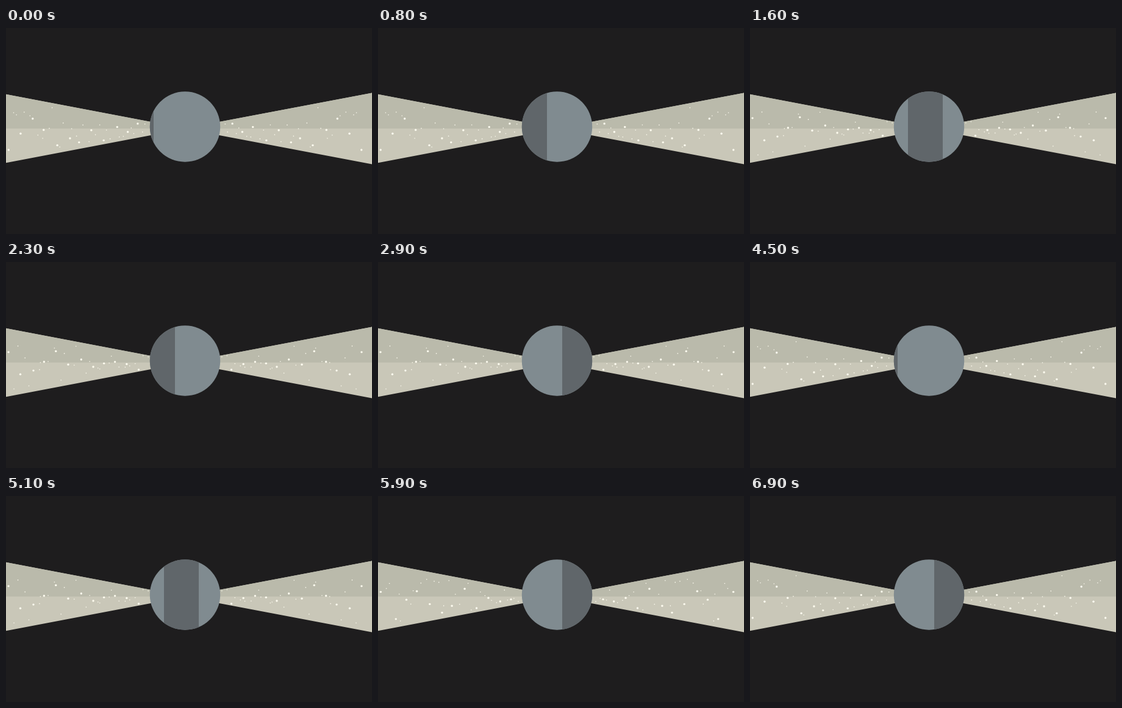
These frames come from a looping animation (600x338 px, 7000 ms). An HTML page with a canvas:

```html
<!DOCTYPE html>
<html lang="en">
<head>
<meta charset="utf-8">
<title>Lighthouse lamp</title>
<style>
  html, body { margin: 0; width: 100%; height: 100%; overflow: hidden; background: #1e1d1e; }
  canvas { display: block; }
</style>
</head>
<body>
<canvas width="600" height="338"></canvas>
<script>
const ctx = document.querySelector('canvas').getContext('2d');
const STEP = 100, STEPS = 70;
const LAMP = { x: 293.5, y: 162, r: 57.7 };
const BAND_WIDTH = 57;
const BEAM = { left: -14, right: 240, middle: 165, farHalf: 58.8, nearHalf: 10.4 };
const SPECKS = 36;

const halfHeight = x => BEAM.nearHalf +
  (BEAM.farHalf - BEAM.nearHalf) * (BEAM.right - x) / (BEAM.right - BEAM.left);

function seededRandom(seed) {
  return () => (seed = seed * 16807 % 2147483647) / 2147483647;
}

// Specks are spread evenly along the beam; every third one is large.
function makeDust(seed) {
  const random = seededRandom(seed);
  return Array.from({ length: SPECKS }, (_, i) => {
    const x = 4 + (i + random()) * 230 / SPECKS;
    const y = BEAM.middle + halfHeight(x) * (random() * 1.7 - 0.85);
    return { x, y, r: i % 3 ? 0.8 : 1.7 };
  });
}

const dust = [1234, 5678, 9012].map(makeDust);

function polygon(color, ...points) {
  ctx.fillStyle = color;
  ctx.beginPath();
  points.forEach(([x, y]) => ctx.lineTo(x, y));
  ctx.fill();
}

function disc(color, { x, y, r }) {
  ctx.fillStyle = color;
  ctx.beginPath();
  ctx.arc(x, y, r, 0, 2 * Math.PI);
  ctx.fill();
}

function beam(specks) {
  const { left, right, middle, farHalf, nearHalf } = BEAM;
  const topFar = [left, middle - farHalf], topNear = [right, middle - nearHalf];
  polygon('#c9c7b8', topFar, topNear, [right, middle + nearHalf], [left, middle + farHalf]);
  polygon('#babaab', topFar, topNear, [right, middle], [left, middle]);
  specks.forEach(speck => disc('#fdfbef', speck));
}

function lamp(bandX) {
  ctx.save();
  disc('#808b90', LAMP);
  ctx.clip();
  ctx.fillStyle = '#60666a';
  ctx.fillRect(bandX, LAMP.y - LAMP.r, BAND_WIDTH, 2 * LAMP.r);
  ctx.restore();
}

function draw() {
  const step = Math.floor(performance.now() / STEP) % STEPS;
  const specks = dust[Math.floor((18 * step + 25) / 13) % dust.length];
  const sweep = (2 * step % 5) / 5;

  ctx.fillStyle = '#1e1d1e';
  ctx.fillRect(0, 0, 600, 338);
  beam(specks);
  ctx.save();
  ctx.translate(2 * LAMP.x, 0);
  ctx.scale(-1, 1);
  beam(specks);
  ctx.restore();
  lamp(185 + 165 * sweep + 50 * sweep * sweep);
  requestAnimationFrame(draw);
}
draw();
</script>
</body>
</html>
```
